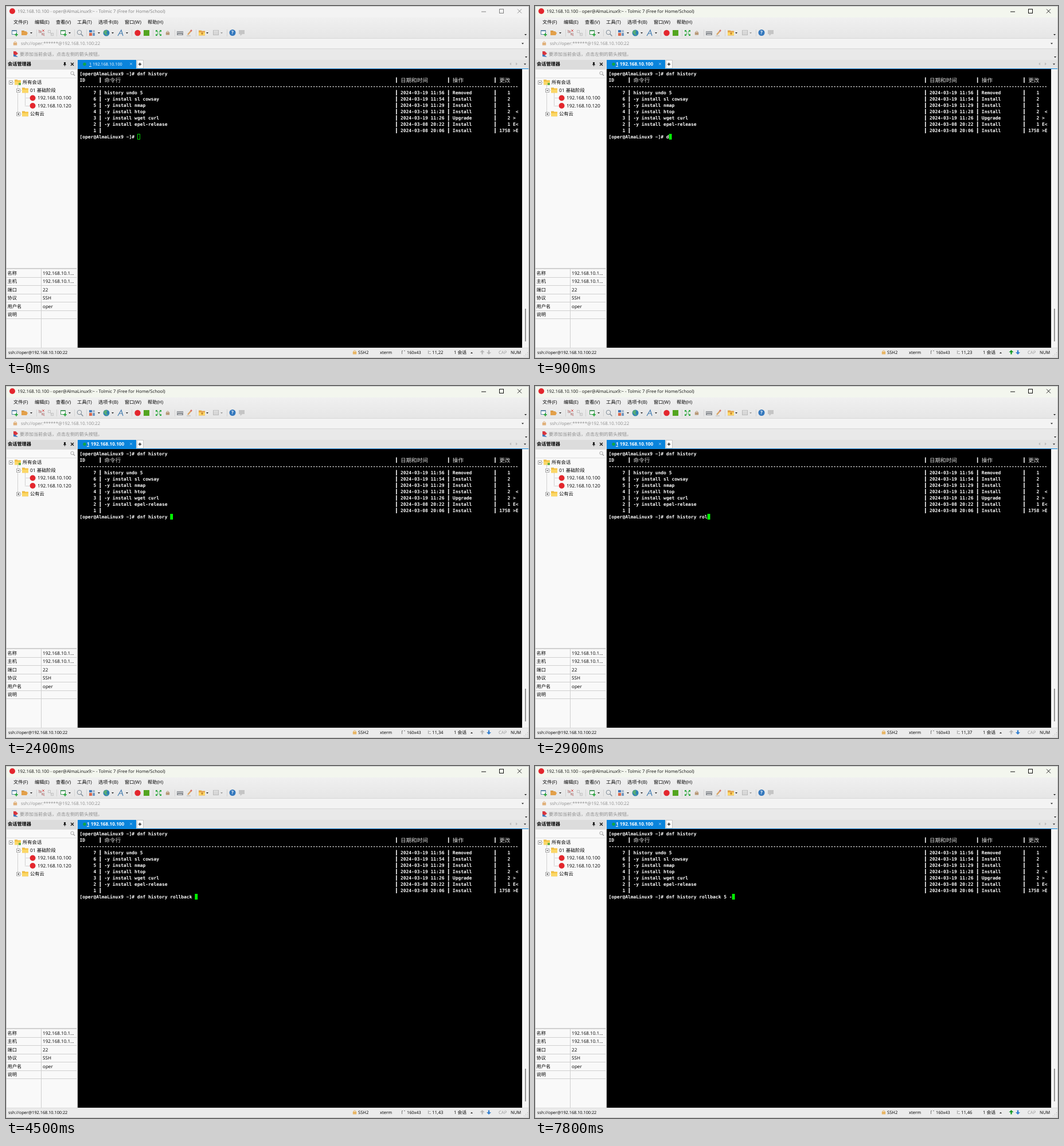
An HTML page with a canvas for the animation above (8000 ms loop, 912x614 px).

```html
<!DOCTYPE html>
<html lang="zh-CN">
<head>
<meta charset="utf-8">
<title>Terminal session</title>
<style>
html, body { margin: 0; width: 100%; height: 100%; overflow: hidden; background: #f0f0f0; }
canvas { display: block; }
</style>
</head>
<body>
<canvas id="stage" width="912" height="614"></canvas>
<script>
const ctx = document.getElementById('stage').getContext('2d');
const LOOP = 8000;
const UI = '"Open Sans", "Noto Sans CJK SC", sans-serif';
const MONO = '"DejaVu Sans Mono", "Noto Sans CJK SC", monospace';
const CELL = 4.782, LEFT = 128.5, ROW = 11;
const USER = 'oper', IP = '192.168.10.100';
const PROMPT = `[${USER}@AlmaLinux9 ~]# `;
const COMMAND = 'dnf history rollback 5 -';
const BLUE = '#0a84dc';

// [time, characters on the command line]
const TYPING = [
  [0, 0], [900, 1], [1000, 2], [1100, 3], [1200, 4], [1400, 5],
  [1600, 6], [1700, 7], [1800, 8], [1900, 9], [2000, 10], [2200, 11],
  [2300, 12], [2500, 13], [2600, 14], [2800, 15], [3500, 14], [3700, 15],
  [3800, 16], [4000, 17], [4100, 18], [4200, 19], [4300, 21],
  [7300, 22], [7400, 23], [7800, 24]
];
const SEND_TOGGLES = [900, 2400, 2500, 2900, 3500, 3600, 3700, 4500, 7300, 7600, 7800];

const HISTORY = [
  ['7', 'history undo 5', '2024-03-19 11:56', 'Removed', '   1'],
  ['6', '-y install sl cowsay', '2024-03-19 11:54', 'Install', '   2'],
  ['5', '-y install nmap', '2024-03-19 11:29', 'Install', '   1'],
  ['4', '-y install htop', '2024-03-19 11:28', 'Install', '   2  <'],
  ['3', '-y install wget curl', '2024-03-19 11:26', 'Upgrade', '   2 >'],
  ['2', '-y install epel-release', '2024-03-08 20:22', 'Install', '   1 E<'],
  ['1', '', '2024-03-08 20:06', 'Install', '1758 >E']
];

function rect(x, y, w, h, color) {
  ctx.fillStyle = color;
  ctx.fillRect(x, y, w, h);
}

function frame(x, y, w, h, color) {
  ctx.strokeStyle = color;
  ctx.lineWidth = 1;
  ctx.strokeRect(x + .5, y + .5, w - 1, h - 1);
}

function circle(x, y, r, color) {
  ctx.fillStyle = color;
  ctx.beginPath();
  ctx.arc(x, y, r, 0, Math.PI * 2);
  ctx.fill();
}

function ring(x, y, r, color, width = 1) {
  ctx.strokeStyle = color;
  ctx.lineWidth = width;
  ctx.beginPath();
  ctx.arc(x, y, r, 0, Math.PI * 2);
  ctx.stroke();
}

function line(color, width, ...points) {
  ctx.strokeStyle = color;
  ctx.lineWidth = width;
  ctx.beginPath();
  points.forEach(([x, y]) => ctx.lineTo(x, y));
  ctx.stroke();
}

function shape(color, ...points) {
  ctx.fillStyle = color;
  ctx.beginPath();
  points.forEach(([x, y]) => ctx.lineTo(x, y));
  ctx.fill();
}

function label(text, x, midY, size = 8.2, color = '#000', weight = 400) {
  ctx.font = `${weight} ${size}px ${UI}`;
  ctx.fillStyle = color;
  ctx.fillText(text, x, midY + size * .36);
}

function cross(x, y, r, color, width = 1) {
  line(color, width, [x - r, y - r], [x + r, y + r]);
  line(color, width, [x + r, y - r], [x - r, y + r]);
}

function plus(x, y, r, color, width = 1) {
  line(color, width, [x - r, y], [x + r, y]);
  line(color, width, [x, y - r], [x, y + r]);
}

function caret(x, y, color = '#222', dir = 1) {
  shape(color, [x - 2, y - dir], [x + 2, y - dir], [x, y + 1.2 * dir]);
}

function folder(x, y, color = '#f5c344') {
  rect(x, y - 4.5, 5, 2, '#dfae42');
  rect(x, y - 3.5, 11, 8, color);
  rect(x, y - 1, 11, 5, '#fbd766');
}

function lock(x, y, color) {
  ctx.strokeStyle = color;
  ctx.lineWidth = 1;
  ctx.beginPath();
  ctx.arc(x, y - 1, 2, Math.PI, 0);
  ctx.stroke();
  rect(x - 3.2, y - 1, 6.4, 4.5, color);
}

function magnifier(x, y, r, color) {
  ring(x, y, r, color);
  line(color, 1.4, [x + r * .7, y + r * .7], [x + r * 1.7, y + r * 1.7]);
}

function sheet(x, color, badge) {
  rect(x - 5, 42, 9, 8, '#fff');
  frame(x - 5, 42, 9, 8, color);
  rect(x - 5, 42, 9, 2, color);
  if (badge) plus(x + 3, 50, 2.7, badge, 1.8);
}

function dataArrow(x, y, dir, color) {
  shape(color, [x - 4, y], [x, y - 4 * dir], [x + 4, y]);
  rect(x - 1.2, dir > 0 ? y : y - 3.5, 2.4, 3.5, color);
}

function drawTitle(active) {
  const color = active ? '#111' : '#808080';
  rect(0, 0, 912, 20, active ? '#f3f6ee' : '#f3f3f3');
  circle(11, 9, 5, '#e3262d');
  label(`${IP} - ${USER}@AlmaLinux9:~ - Tolmic 7 (Free for Home/School)`, 20, 9.3, 7.8, color);
  line(color, 1, [829, 10], [837, 10]);
  frame(860, 5, 8, 8, color);
  cross(895.5, 9, 3.5, color, .9);
}

function drawToolbar() {
  const shade = ctx.createLinearGradient(0, 20, 0, 56);
  shade.addColorStop(0, '#f0f0f0');
  shade.addColorStop(1, '#e6e6e6');
  rect(0, 20, 912, 36, shade);
  const menu = [['文件(F)', 13], ['编辑(E)', 50], ['查看(V)', 87], ['工具(T)', 124],
    ['选项卡(B)', 161], ['窗口(W)', 207], ['帮助(H)', 247]];
  menu.forEach(([name, x]) => label(name, x, 28.5, 8.2));

  [53, 88, 119, 140, 219, 256, 294, 331, 385].forEach(x => rect(x, 41, 1, 12, '#d2d2d2'));
  [44, 111, 162, 186, 211, 351].forEach(x => caret(x, 47));
  caret(376, 47, '#999');

  sheet(15, '#5d87a8', '#27a53a');
  rect(27, 43, 5, 2, '#c98a35');
  shape('#e3a04a', [27, 44], [35, 44], [38, 47], [36, 51], [27, 51]);
  line('#d98a8a', 1.3, [57, 42], [61, 46]);
  line('#d98a8a', 1.3, [63, 48], [67, 52]);
  frame(57, 43, 5, 4, '#b8a4a4');
  frame(62, 47, 5, 4, '#b8a4a4');
  cross(65, 43, 1.8, '#d84b4b');
  frame(73, 42, 5, 5, '#c4c4c4');
  frame(78, 47, 5, 5, '#c4c4c4');
  line('#c4c4c4', 1, [76, 46], [81, 50]);
  sheet(100, '#4e9a61', '#27a53a');
  magnifier(128, 46, 3.8, '#7d8a96');
  rect(145, 42, 5, 4, '#3f78b5');
  rect(151, 42, 4, 4, '#a9bacd');
  rect(145, 47, 5, 5, '#d9694d');
  rect(151, 47, 4, 5, '#6f97c0');
  circle(175, 47, 5.5, '#2e80b4');
  shape('#57ac75', [172, 42], [177, 43], [175, 47], [178, 51], [173, 50], [170, 46]);
  line('#3d78ad', 1.2, [195, 52], [201, 42], [204, 52]);
  line('#3d78ad', 1, [198, 48], [203, 48]);
  circle(229.5, 47, 5.2, '#e3262d');
  rect(240, 42, 10, 10, '#53a51f');

  for (const sx of [-1, 1]) for (const sy of [-1, 1]) {
    line('#27a53a', 1.3, [266 + sx, 47 + sy], [266 + 4 * sx, 47 + 4 * sy]);
    shape('#27a53a', [266 + 5 * sx, 47 + 5 * sy], [266 + 1.5 * sx, 47 + 5 * sy], [266 + 5 * sx, 47 + 1.5 * sy]);
  }
  lock(282, 47, '#b99978');
  rect(298, 44, 11, 7, '#8b8f94');
  for (let x = 299; x < 308; x += 2) rect(x, 45, 1, 2, '#e5e5e5');
  rect(300, 49, 7, 1, '#e5e5e5');
  line('#d9a565', 2.5, [317, 50], [323, 43]);
  line('#d86e65', 2.5, [322, 44], [324, 42]);
  line('#b5b5b5', 1, [315, 52], [322, 52]);
  folder(336, 47, '#e5a44c');
  plus(342, 48, 2, '#b86c22');
  frame(361, 42, 10, 9, '#b9b9b9');
  line('#b9b9b9', 1, [361, 45.5], [371, 45.5]);
  line('#b9b9b9', 1, [361, 48.5], [371, 48.5]);
  circle(395, 46.5, 5.5, '#3478bd');
  label('?', 393, 46.5, 8, '#fff', 700);
  rect(406, 42, 10, 7, '#c5c5c5');
  shape('#c5c5c5', [408, 49], [412, 49], [409, 52]);
  caret(906, 50);

  rect(0, 56, 912, 1, '#d8d8d8');
  rect(0, 57, 912, 17, '#f3f3f3');
  rect(0, 74, 912, 1, '#d8d8d8');
  rect(0, 75, 912, 19, '#e9e9e9');
  lock(16, 65, '#e0b07a');
  label(`ssh://${USER}:******@${IP}:22`, 26, 65.5, 7.8, '#8c8c8c');
  caret(901, 65.5);
  shape('#d9363e', [13, 79], [17, 79], [21, 83], [17, 86], [13, 86]);
  shape('#3976bd', [13, 84], [17, 86], [21, 89], [13, 88]);
  label('要添加当前会话，点击左侧的箭头按钮。', 24, 84.5, 8, '#8c8c8c');
  caret(907, 89);
}

function toggleBox(x, y, closed) {
  rect(x - 3, y - 3, 6, 6, '#fff');
  frame(x - 3, y - 3, 7, 7, '#a5a5a5');
  rect(x - 1, y, 3, 1, '#444');
  if (closed) rect(x, y - 1, 1, 3, '#444');
}

function drawSidebar() {
  rect(0, 94, 124, 16, '#dcdcdc');
  label('会话管理器', 3, 101.5, 8.2, '#000', 700);
  rect(101, 98, 3, 4, '#222');
  rect(100, 102, 5, 1, '#222');
  rect(102, 103, 1, 2, '#222');
  cross(115.5, 101.5, 2.5, '#111', 1.2);
  rect(0, 110, 124, 486, '#f9f9f9');
  frame(0, 110, 124, 16, '#dddddd');
  magnifier(115.5, 117, 2.7, '#a5a5a5');

  ctx.setLineDash([1, 1]);
  line('#aaa', 1, [11, 133.5], [15, 133.5]);
  line('#aaa', 1, [20.5, 138], [20.5, 188]);
  line('#aaa', 1, [20, 147.5], [28, 147.5]);
  line('#aaa', 1, [20, 188.5], [28, 188.5]);
  line('#aaa', 1, [33.5, 152], [33.5, 174.5], [41, 174.5]);
  line('#aaa', 1, [33, 160.5], [41, 160.5]);
  ctx.setLineDash([]);
  toggleBox(8, 133);
  toggleBox(21, 147);
  toggleBox(21, 188, true);
  folder(15, 133);
  rect(22, 134, 4, 4, '#61ad45');
  folder(28, 147);
  folder(28, 188);
  circle(46.5, 160.5, 5, '#e3262d');
  circle(46.5, 174, 5, '#e3262d');
  label('所有会话', 29, 133.3, 8.3);
  label('01 基础阶段', 42, 147, 8.3);
  label(IP, 55, 160.5, 8.3);
  label('192.168.10.120', 55, 174.3, 8.3);
  label('公有云', 42, 188, 8.3);

  rect(0, 457, 124, 2, '#d0d0d0');
  const props = [['名称', '192.168.10.1...'], ['主机', '192.168.10.1...'], ['端口', '22'],
    ['协议', 'SSH'], ['用户名', USER], ['说明', '']];
  props.forEach(([key, value], i) => {
    const y = 466 + i * 14.4;
    label(key, 2.5, y, 8.2);
    label(value, 64, y, 8.1);
    rect(0, Math.round(y + 7), 124, 1, '#cfcfcf');
  });
  rect(61, 459, 1, 137, '#cfcfcf');
  rect(123, 94, 2, 502, '#e3e3e3');
}

function drawTabs(active) {
  rect(125, 94, 787, 16, '#e2e2e2');
  rect(125, 94, 102, 16, BLUE);
  circle(137, 101.5, 2.8, '#11a54a');
  const x = active ? 141 : 145;
  label(`1 ${IP}`, x, 101.5, active ? 8.2 : 7.3, '#fff', active ? 700 : 400);
  rect(x, 105, 4, 1, '#fff');
  cross(218, 101, 1.9, '#a9d2f2', .9);
  rect(228, 94, 12, 15, '#fbfbfb');
  frame(228, 94, 12, 15, '#c5c5c5');
  plus(233.5, 101.5, 2.7, '#111', 1.2);
  shape('#bdbdbd', [881, 98.5], [881, 103.5], [878, 101]);
  shape('#bdbdbd', [889, 98.5], [889, 103.5], [892, 101]);
  caret(905, 101.5);
  rect(125, 109, 787, 1, BLUE);
}

function put(text, col, row) {
  ctx.font = `700 ${CELL / .602}px ${MONO}`;
  ctx.fillStyle = '#fff';
  ctx.fillText(text, LEFT + col * CELL, 120.9 + row * ROW);
}

function heading(text, col) {
  ctx.font = `400 ${CELL * 2}px ${MONO}`;
  ctx.fillStyle = '#e0e0e0';
  ctx.fillText(text, LEFT + col * CELL, 133);
}

function bars(row) {
  for (const col of [7, 115, 134, 151]) {
    rect(LEFT + (col + .5) * CELL - .8, 113.5 + row * ROW, 1.6, 9.5, '#f4f4f4');
  }
}

function drawTerminal(active, count) {
  rect(125, 110, 775, 486, '#000');
  put(PROMPT + 'dnf history', 0, 0);
  put('ID', 0, 1);
  [['命令行', 9], ['日期和时间', 117], ['操作', 136], ['更改', 153]].forEach(h => heading(...h));
  put('-'.repeat(160), 0, 2);
  bars(1);
  HISTORY.forEach(([id, command, date, action, changes], i) => {
    const row = i + 3;
    bars(row);
    put(id, 5, row);
    put(command, 9, row);
    put(date, 117, row);
    put(action, 136, row);
    put(changes, 153, row);
  });
  put(PROMPT + COMMAND.slice(0, count), 0, 10);
  const x = LEFT + (PROMPT.length + count) * CELL;
  if (active) rect(x, 223, CELL, 10, '#00ff00');
  else frame(Math.round(x), 223, 5, 10, '#00d000');

  rect(900, 110, 12, 486, '#f5f5f5');
  rect(905, 528, 1.6, 57, '#808080');
}

function drawStatus(count, sending, receiving) {
  rect(0, 596, 912, 18, '#ebebeb');
  rect(0, 596, 912, 1, '#dcdcdc');
  label(`ssh://${USER}@${IP}:22`, 4, 604.5, 7.3);
  lock(608, 604, '#e8b563');
  label('SSH2', 614, 604.5, 7.6);
  label('xterm', 652, 604.5, 7.6);
  line('#777', 1, [690.5, 607], [690.5, 601.5], [692, 601.5]);
  line('#777', 1, [694, 601.5], [696, 601.5]);
  label('160x43', 699, 604.5, 7.3);
  rect(736, 601, 1, 6, '#999');
  rect(738, 602, 2, 1, '#999');
  rect(738, 606, 3, 1, '#999');
  label(`11,${PROMPT.length + count + 1}`, 743, 604.5, 7.7);
  label('1 会话', 781, 604.5, 7.8);
  caret(812, 605, '#222', -1);
  dataArrow(830.5, 604, 1, sending ? '#159a25' : '#b9b9b9');
  dataArrow(842, 604, -1, receiving ? '#327fd0' : '#b9b9b9');
  label('CAP', 859, 604.5, 7.7, '#999');
  label('NUM', 880, 604.5, 7.6);
  for (let i = 0; i < 3; i++) for (let j = 0; j <= i; j++) {
    rect(909 - j * 3, 604 + i * 3, 1, 1, '#aaa');
  }
}

function draw(now) {
  const t = now % LOOP;
  const active = t >= 200;
  const count = TYPING.filter(([at]) => at <= t).pop()[1];
  const sending = SEND_TOGGLES.filter(at => at <= t).length % 2 === 1;
  const receiving = t >= 300 && !(t >= 4000 && t < 4100);
  ctx.textRendering = 'geometricPrecision';
  drawTitle(active);
  drawToolbar();
  drawSidebar();
  drawTabs(active);
  drawTerminal(active, count);
  drawStatus(count, sending, receiving);
  frame(0, 0, 912, 614, '#c4c4c4');
}

function tick() {
  draw(performance.now());
  requestAnimationFrame(tick);
}
tick();
</script>
</body>
</html>
```
